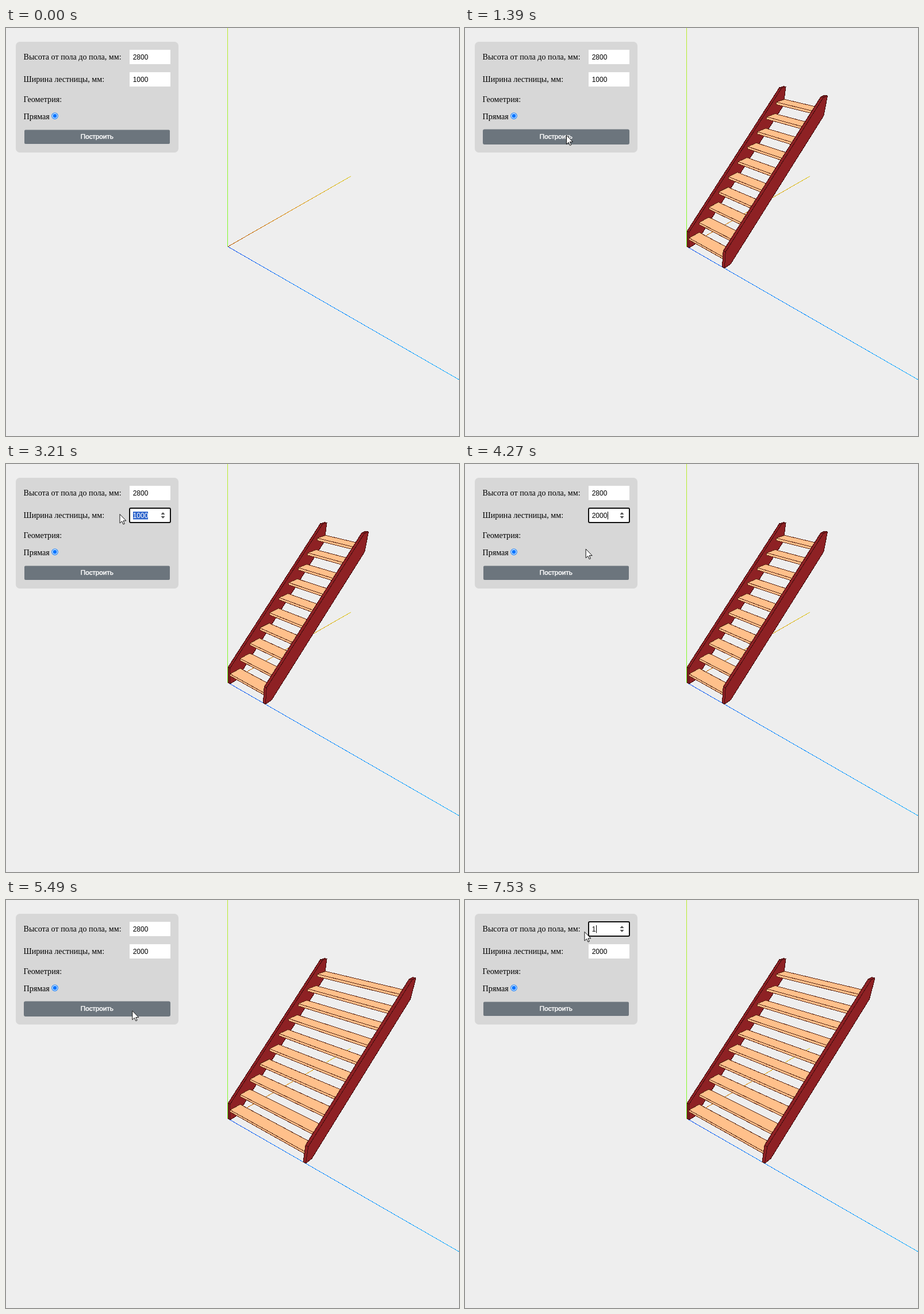
An HTML page for the animation above (7.99 s loop, 788 px wide and 711 px high).

```html
<!DOCTYPE html>
<html lang="ru">
<head>
<meta charset="utf-8">
<title>Лестница</title>
<style>
  html, body { margin: 0; width: 100%; height: 100%; overflow: hidden; background: #eee; }
  svg { display: block; width: 788px; height: 711px; }
  .crisp { shape-rendering: crispEdges; }
  .label { font: 14.1px "Liberation Serif", "Times New Roman", serif; fill: #000; }
  .value { font: 12px "Liberation Sans", Arial, sans-serif; }
  .caption { font: 11.67px "Liberation Sans", Arial, sans-serif; fill: #fff; stroke: #fff; stroke-width: .45px; }
  .stringer { fill: #8e2124; stroke: #420e0f; stroke-width: 1; stroke-linejoin: round; }
  .tread { fill: #ffc08b; stroke: #5c2716; stroke-width: 1; stroke-linejoin: round; }
</style>
</head>
<body>
<svg viewBox="0 0 788 711">
  <defs>
    <linearGradient id="gx" gradientUnits="userSpaceOnUse" x1="386" y1="381" x2="600" y2="258">
      <stop stop-color="#b85800"/><stop offset=".5" stop-color="#dc8e10"/><stop offset="1" stop-color="#dcc61c"/>
    </linearGradient>
    <linearGradient id="gy" gradientUnits="userSpaceOnUse" x1="386" y1="381" x2="386" y2="0">
      <stop stop-color="#7cfb28"/><stop offset="1" stop-color="#bcea2c"/>
    </linearGradient>
    <linearGradient id="gz" gradientUnits="userSpaceOnUse" x1="386" y1="381" x2="788" y2="613">
      <stop stop-color="#1a58ee"/><stop offset=".35" stop-color="#1a8cff"/><stop offset="1" stop-color="#1eb0ff"/>
    </linearGradient>
  </defs>
  <rect width="788" height="711" fill="#eee"/>
  <g class="crisp" fill="none">
    <path d="M385.5 381V0" stroke="url(#gy)"/>
    <path d="M386 381L600 258.3" stroke="url(#gx)"/>
    <path d="M386 381L788 612.8" stroke="url(#gz)"/>
  </g>
  <g id="stairs" class="crisp"></g>

  <rect x="17" y="24" width="283" height="193" rx="7" fill="#d7d7d7"/>
  <text class="label" x="30.5" y="55">Высота от пола до пола, мм:</text>
  <text class="label" x="30.5" y="94">Ширина лестницы, мм:</text>
  <text class="label" x="30.5" y="129">Геометрия:</text>
  <text class="label" x="30.5" y="159">Прямая</text>
  <circle cx="85" cy="153.2" r="5.2" fill="#fff" stroke="#0075ff" stroke-width="1.1"/>
  <circle cx="85" cy="153.2" r="3.4" fill="#0075ff"/>
  <g id="fields"></g>
  <rect id="button" fill="#6c757d"/>
  <text class="caption" x="158.3" y="193" text-anchor="middle">Построить</text>

  <circle id="halo" cx="-.5" cy="-.5" r="13.3" fill="#e6d810" fill-opacity=".6"/>
  <path id="arrow" d="M0 0V15.6L3.6 12.2L6 17.6L8.3 16.6L6 11.4H11Z" fill="#fff" stroke="#111" stroke-width="1"/>
  <path id="beam" d="M-3 -6.5H-1L0 -5.5L1 -6.5H3M0 -5.5V5.5M-3 6.5H-1L0 5.5L1 6.5H3" fill="none" stroke="#222" stroke-width="1.2"/>
</svg>
<script>
const LOOP = 7990, STEP = 66.5;
const $ = id => document.getElementById(id);

function add(parent, tag, attrs) {
  const el = document.createElementNS("http://www.w3.org/2000/svg", tag);
  for (const k in attrs) el.setAttribute(k, attrs[k]);
  return parent.appendChild(el);
}
const show = (el, on) => { el.style.display = on ? "" : "none"; };

// Isometric view with perspective; lengths in metres
function project([x, y, z]) {
  const w = 1 + 0.0648 * (x - y - z);
  return [386.4 + 56.5 * (x + z) / w, 381 - 32.62 * (x + 2 * y - z) / w]
    .map(v => v.toFixed(2)).join();
}

function face(parent, cls, points) {
  add(parent, "polygon", { class: cls, points: points.map(project).join(" ") });
}

const RISE = .256, RUN = .3, THICK = .05;
const PROFILE = [[0, 0], [0, .405], [2.84, 2.83], [3, 2.83], [3, 2.42], [.19, 0]];

function stringer(parent, z0, z1) {
  for (let i = 0; i < 3; i++) {
    const a = PROFILE[i], b = PROFILE[i + 1];
    face(parent, "stringer", [[...a, z0], [...b, z0], [...b, z1], [...a, z1]]);
  }
  face(parent, "stringer", PROFILE.map(p => [...p, z1]));
}

function tread(parent, n, z0, z1) {
  const x = RUN * (n - 1), back = x + .31, y = RISE * n, low = y - THICK;
  face(parent, "tread", [[x, y, z0], [back, y, z0], [back, y, z1], [x, y, z1]]);
  face(parent, "tread", [[x, y, z0], [x, low, z0], [x, low, z1], [x, y, z1]]);
}

function staircase(width) {
  const g = add($("stairs"), "g", {});
  stringer(g, 0, .06);
  for (let n = 10; n > 0; n--) tread(g, n, .06, width + .01);
  stringer(g, width + .01, width + .07);
  return g;
}

function field(top) {
  const g = add($("fields"), "g", {}), box = { x: 215, y: top, width: 71, height: 25 };
  add(g, "rect", { ...box, fill: "#fff" });
  return {
    top,
    ring: add(g, "rect", { ...box, rx: 2, fill: "none", stroke: "#101010", "stroke-width": 2 }),
    mark: add(g, "rect", { x: 221, y: top + 6, width: 26, height: 13.5, fill: "#2f65cc" }),
    text: add(g, "text", { class: "value", x: 220.7, y: top + 17 }),
    caret: add(g, "rect", { y: top + 6, width: 1, height: 13.5, fill: "#000" }),
    spin: add(g, "path", { d: `M269.5 ${top + 11}h7l-3.5 -4zM269.5 ${top + 14}h7l-3.5 4z`, fill: "#505050" })
  };
}

const flights = [staircase(1), staircase(2)];
const fields = [field(38), field(77)];

const EVENTS = [
  [0, { built: 0, focus: 0, sel: 0, press: 0, v1: "2800", v2: "1000" }],
  [1130, { press: 1 }], [1260, { press: 0 }], [1390, { built: 1 }],
  [2390, { press: 1, focus: 2 }], [2490, { sel: 1 }], [3200, { press: 0 }],
  [3350, { sel: 0, v2: "2" }], [3470, { v2: "20" }], [3800, { v2: "200" }], [3930, { v2: "2000" }],
  [4740, { press: 1, focus: 0 }], [4940, { press: 0 }], [5080, { built: 2 }],
  [6050, { press: 1, focus: 1 }], [6260, { sel: 1 }], [6580, { press: 0 }],
  [7530, { sel: 0, v1: "1" }]
];

// Pointer stops: time, x, y
const PATH = [
  [240, 706, 693], [925, 176.5, 187], [1850, 176.5, 187], [2190, 242, 97], [2390, 251, 94],
  [2620, 200, 92], [2750, 200, 91], [3190, 198, 87.5], [4000, 198, 87.5], [4470, 219.5, 194.5],
  [5420, 219.5, 194.5], [5980, 250, 54], [6050, 250, 55], [6180, 222, 57], [6400, 208, 55.5]
];

function pointer(t) {
  if (t < 240) return null;
  const q = Math.floor(t / STEP) * STEP;
  const i = PATH.findIndex(p => p[0] > q);
  if (i < 0) return PATH[PATH.length - 1].slice(1);
  if (i === 0) return PATH[0].slice(1);
  const [t0, x0, y0] = PATH[i - 1], [t1, x1, y1] = PATH[i];
  const u = (q - t0) / (t1 - t0), e = u * u * (3 - 2 * u);
  return [x0 + (x1 - x0) * e, y0 + (y1 - y0) * e];
}

const inside = (p, x, y, w, h) => !!p && p[0] >= x && p[0] <= x + w && p[1] >= y && p[1] <= y + h;

function place(el, p, on) {
  show(el, on);
  if (on) el.setAttribute("transform", `translate(${p[0]} ${p[1]})`);
}

function draw(t) {
  const s = {};
  for (const [at, change] of EVENTS) if (at <= t) Object.assign(s, change);
  const p = pointer(t);
  let typing = false;

  flights.forEach((g, i) => show(g, s.built === i + 1));

  fields.forEach((f, i) => {
    const value = i ? s.v2 : s.v1;
    const active = s.focus === i + 1, selected = active && !!s.sel;
    const over = inside(p, 215, f.top, 71, 25);
    typing = typing || over;
    f.text.textContent = value;
    f.text.setAttribute("fill", selected ? "#fff" : "#000");
    f.caret.setAttribute("x", Math.round(221.3 + value.length * 6.6));
    show(f.ring, active);
    show(f.mark, selected);
    show(f.caret, active && !selected);
    show(f.spin, active || over);
  });

  const hover = inside(p, 31, 177, 255, 26), pad = hover ? 0 : 1;
  const box = { x: 31 + pad, y: 176.5 + pad, width: 255 - 2 * pad, height: 26.5 - 2 * pad, rx: 3 - pad };
  for (const k in box) $("button").setAttribute(k, box[k]);

  place($("halo"), p, !!p && !!s.press);
  place($("arrow"), p, !!p && !typing);
  place($("beam"), p, !!p && typing);
}

function tick() {
  draw(performance.now() % LOOP);
  requestAnimationFrame(tick);
}
tick();
</script>
</body>
</html>
```
